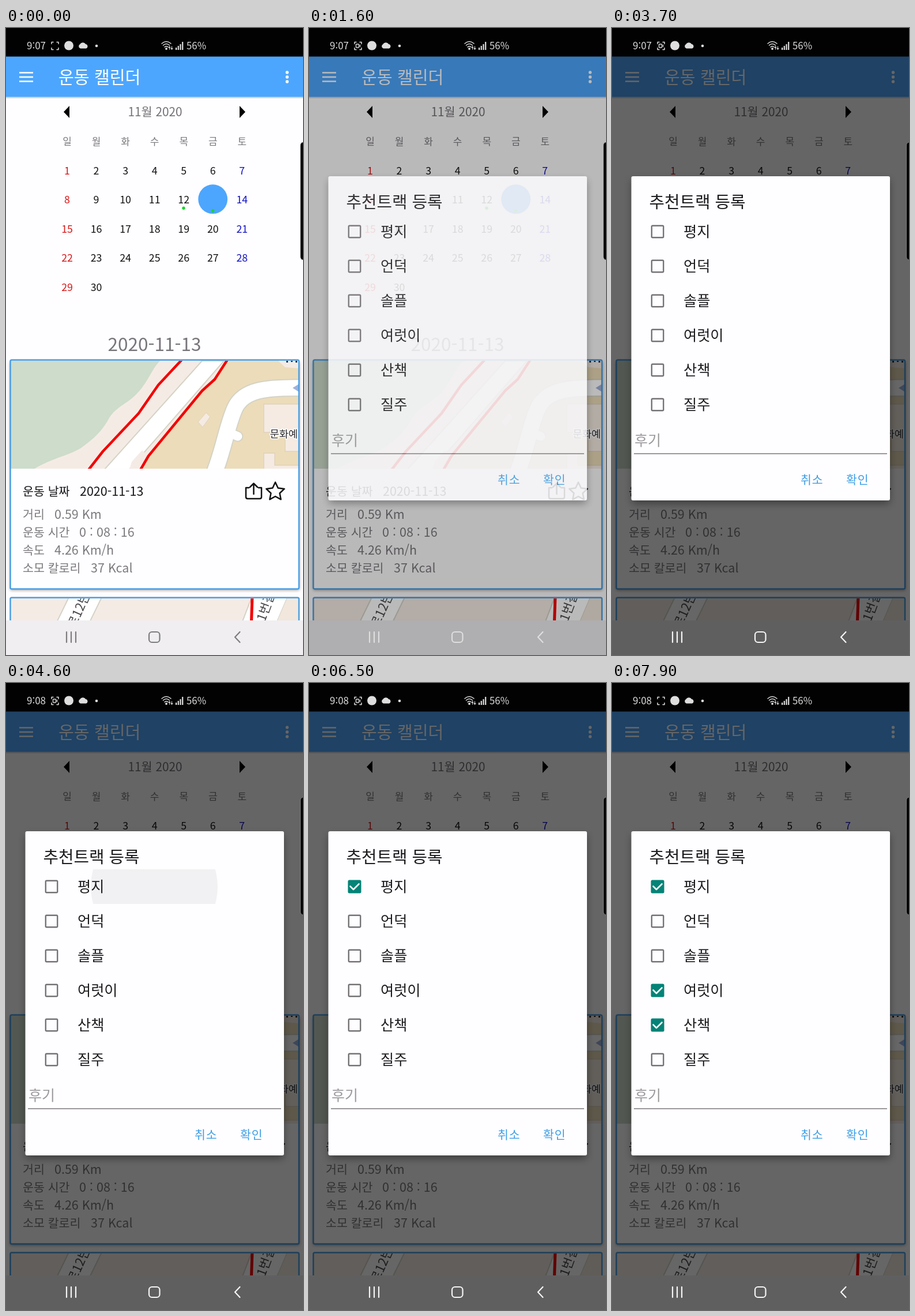
Animation of 515 by 1087 pixels, one loop 8 s. Source, as an HTML page:

```html
<!DOCTYPE html>
<html lang="ko">
<head>
<meta charset="utf-8">
<title>운동 캘린더</title>
<style>
  html, body { margin: 0; width: 100%; height: 100%; overflow: hidden; background: #000; }
  svg { display: block; width: 515px; height: 1087px; }
  text { font-family: "Noto Sans CJK KR", "Noto Sans CJK", "Noto Sans", sans-serif; }
  .mid { text-anchor: middle; }
  .line { fill: none; stroke-linecap: round; stroke-linejoin: round; }
</style>
</head>
<body>
<svg viewBox="0 0 515 1087">
  <defs>
    <clipPath id="map1"><rect x="8" y="577" width="499" height="187"/></clipPath>
    <clipPath id="map2"><rect x="8" y="989" width="499" height="38"/></clipPath>
    <clipPath id="rowClip"><rect id="rowBox" x="34" width="447" height="60"/></clipPath>
    <filter id="soft" x="-10%" y="-10%" width="120%" height="120%"><feGaussianBlur stdDeviation="2.5"/></filter>
    <filter id="deep" x="-10%" y="-10%" width="120%" height="120%"><feGaussianBlur stdDeviation="7"/></filter>
  </defs>

  <rect width="515" height="1087" fill="#fefdff"/>

  <!-- app bar -->
  <rect y="119" width="515" height="3" fill="#000" opacity=".12"/>
  <rect y="49" width="515" height="70.500" fill="#4da6fd"/>
  <path d="M23 77.500H47M23 85H47M23 92.500H47" stroke="#fff" stroke-width="2.400"/>
  <text x="91" y="95.500" font-size="29.200" fill="#fff">운동 캘린더</text>
  <g fill="#fff"><circle cx="487.500" cy="77" r="2.700"/><circle cx="487.500" cy="85" r="2.700"/><circle cx="487.500" cy="93" r="2.700"/></g>

  <!-- calendar -->
  <path d="M110 135V156L100 145.500ZM405 135V156L415 145.500Z" fill="#000"/>
  <text class="mid" x="258.500" y="153" font-size="20.800" font-weight="500" fill="#747276">11월 2020</text>
  <g id="days"></g>
  <circle cx="358.700" cy="296.700" r="25.400" fill="#4da6fd"/>
  <g fill="#18d52c"><circle cx="308" cy="312.300" r="2.700"/><circle cx="358.700" cy="317" r="2.700"/></g>
  <text class="mid" x="257.500" y="559.500" font-size="31.500" fill="#77757a">2020-11-13</text>

  <!-- first card -->
  <rect x="7" y="578" width="502" height="397" rx="3" fill="#000" opacity=".35" filter="url(#soft)"/>
  <rect x="7.500" y="575.500" width="500.500" height="397" rx="2.500" fill="#fefdff"/>
  <g clip-path="url(#map1)">
    <rect x="8" y="576" width="500" height="190" fill="#f5ebe5"/>
    <path d="M8 577H267C252 592 246 615 226 635C208 653 192 656 179 676C165 702 151 712 133 726C112 741 80 745 48 765H8Z" fill="#cddccb"/>
    <path d="M384 577L363 609 341 629 248 742 234 765H508V590L484 588 472 577Z" fill="#ecdcb9"/>
    <path d="M340 577L171 765H214L378 577Z" fill="#fff" stroke="#d4d3c6" stroke-width="2"/>
    <path d="M214 765L218 752 236 732 245 741 230 765Z" fill="#f5ebe5"/>
    <path d="M447 652H508V734H484V701H447Z" fill="#f5ebe2" stroke="#dfd2bd" stroke-width="1.500"/>
    <path d="M447 765V737H466V758H508V765Z" fill="#f5ebe2" stroke="#dfd2bd" stroke-width="1.500"/>
    <path d="M333 683L347 667 354 674 341 692Z" fill="#f5ebe2" stroke="#dfd2bd"/>
    <g class="line">
      <path d="M520 624C445 622 411 629 397 659C383 690 378 729 361 772" stroke="#d4d3c6" stroke-width="31"/>
      <path d="M388 702L402 708" stroke="#d4d3c6" stroke-width="19"/>
      <path d="M520 624C445 622 411 629 397 659C383 690 378 729 361 772" stroke="#fff" stroke-width="27"/>
      <path d="M388 702L402 708" stroke="#fff" stroke-width="15"/>
      <path d="M305 575L264 619 230 668 168 734 143 766M384 575L362 609 340 629 247 742 233 766" stroke="#f30000" stroke-width="4.500"/>
    </g>
    <path d="M497 624L508 617V631Z" fill="#9fb0dc"/>
    <path d="M486 576h3v4h-3zM494 576h3v3h-3zM502 576h3v4h-3z" fill="#333"/>
    <text x="457.500" y="710" font-size="17.600" font-weight="500" fill="#2b292c" stroke="#fff" stroke-width="3" paint-order="stroke">문화예</text>
  </g>
  <rect x="7.500" y="575.500" width="500.500" height="397" rx="2.500" fill="none" stroke="#4a9fe2" stroke-width="2.500"/>
  <g id="facts"></g>
  <g class="line" stroke="#111" stroke-width="2.500">
    <path d="M421 797H416V813Q416 816 419 816H440Q443 816 443 813V797H438M429.500 808V790M423 796L429.500 789.500 436 796"/>
    <path id="star"/>
  </g>

  <!-- second card -->
  <rect x="7.500" y="987.500" width="500.500" height="60" rx="2.500" fill="#f5ebe5"/>
  <g clip-path="url(#map2)">
    <path d="M109 987L86 1034H143L166 987Z" fill="#fff" stroke="#d4d3c6" stroke-width="2"/>
    <path d="M426 987L408 1034H468L488 987Z" fill="#fff" stroke="#d4d3c6" stroke-width="2"/>
    <path d="M488 987L468 1034H508V987Z" fill="#f1e7dc"/>
    <path d="M427 986L425.500 1030" stroke="#f30000" stroke-width="5"/>
    <g font-size="22" fill="#4a484b">
      <text transform="translate(120 1042) rotate(-66)">로12번</text>
      <text transform="translate(449 1030) rotate(-70)">1번길</text>
    </g>
  </g>
  <rect x="7.500" y="987.500" width="500.500" height="60" rx="2.500" fill="none" stroke="#4a9fe2" stroke-width="2.500"/>
  <rect y="1027" width="515" height="60" fill="#f0eef1"/>

  <rect id="dim" y="49" width="515" height="1038" fill="#000"/>

  <g id="nav" class="line" stroke-width="2.200">
    <path d="M105 1047V1065M113 1047V1065M121 1047V1065"/>
    <rect x="248" y="1047" width="18.500" height="18" rx="5"/>
    <path d="M405.500 1047L397 1056 405.500 1065"/>
  </g>
  <path d="M516 198Q510.500 198 510.500 204V396Q510.500 402 516 402Z" fill="#050505" stroke="#aaa" stroke-width=".6"/>

  <!-- dialog -->
  <g id="dialog">
    <rect x="35" y="264" width="446" height="560" fill="#000" opacity=".4" filter="url(#deep)"/>
    <rect x="33.500" y="257" width="448.500" height="562" rx="3" fill="#fefdff"/>
    <circle id="ripple" cx="257" fill="#000" clip-path="url(#rowClip)"/>
    <text x="64.500" y="312" font-size="28.800" fill="#1c1b1d">추천트랙 등록</text>
    <g id="items"></g>
    <text x="39" y="723.500" font-size="25" fill="#9b999c">후기</text>
    <path d="M38 738H477" stroke="#7b797c" stroke-width="1.600"/>
    <g font-size="20.500" fill="#3d9fe6" letter-spacing="1"><text x="327" y="790.500">취소</text><text x="406" y="790.500">확인</text></g>
  </g>

  <!-- status bar -->
  <rect width="515" height="49.500" fill="#020202"/>
  <g fill="#dedede">
    <text id="clock" x="36" y="37" font-size="17"></text>
    <circle cx="109" cy="30.500" r="8"/>
    <path d="M129 35.500A4 4 0 0 1 128.500 28A5.500 5.500 0 0 1 138 28A3.900 3.900 0 0 1 139 35.500Z"/>
    <circle cx="157" cy="31" r="2.300"/>
    <path d="M294 34h2.200v4H294zM297.700 31h2.200v7h-2.200zM301.400 28h2.200v10h-2.200zM305.100 24h2.200v14h-2.200z"/>
    <text x="313" y="37" font-size="16.800">56%</text>
    <circle cx="278" cy="36" r="1.900"/>
  </g>
  <g class="line" stroke="#dedede" stroke-width="1.500">
    <path d="M79 27.500V24.500H82M88 24.500H91V27.500M91 34.500V37.500H88M82 37.500H79V34.500"/>
    <path d="M270 27Q278 20 286 27M272.500 30Q278 25 283.500 30M275 33Q278 30.500 281 33"/>
    <path d="M283.500 37V32M282 34L283.500 32 285 34M287.500 32V37M286 35.500L287.500 37 289 35.500" stroke-width="1.100"/>
    <g id="camera" stroke-width="1.400"><rect x="81.500" y="28" width="5" height="6" rx="1"/><path d="M88.500 29.500V32.500"/></g>
  </g>
</svg>
<script>
const LOOP = 8000, STEP = 100;
const $ = id => document.getElementById(id);
const set = (el, attrs) => { for (const k in attrs) el.setAttribute(k, attrs[k]); };

// Calendar
const colX = i => 106 + 50.55 * i;
const label = (x, y, size, fill, s) =>
  `<text class="mid" x="${x}" y="${y}" font-size="${size}" fill="${fill}">${s}</text>`;
let days = [...'일월화수목금토'].map((d, i) => label(colX(i), 202.5, 17, '#7b797c', d)).join('');
for (let d = 1; d <= 30; d++) {
  if (d === 13) continue;
  const col = (d - 1) % 7, row = Math.floor((d - 1) / 7);
  const fill = col === 0 ? '#d81717' : col === 6 ? '#1212c4' : '#111';
  days += label(colX(col), 253.5 + 50.5 * row, 17.8, fill, d);
}
$('days').innerHTML = days;

// Workout details
const facts = [
  ['거리', '0.59 Km', 84], ['운동 시간', '0 : 08 : 16', 127],
  ['속도', '4.26 Km/h', 84], ['소모 칼로리', '37 Kcal', 147]
];
const fact = (name, value, x, y, style) =>
  `<g ${style}><text x="29" y="${y}" font-size="20.6">${name}</text>` +
  `<text x="${x}" y="${y}" font-size="21.5">${value}</text></g>`;
$('facts').innerHTML =
  fact('운동 날짜', '2020-11-13', 128, 811, 'fill="#161517" font-weight="500"') +
  facts.map(([n, v, x], i) => fact(n, v, x, 850.5 + 31.2 * i, 'fill="#7b797c"')).join('');

$('star').setAttribute('d', 'M' + Array.from({ length: 10 }, (_, i) => {
  const a = (i / 5 - 0.5) * Math.PI, r = i % 2 ? 8 : 16.5;
  return (467 + r * Math.cos(a)).toFixed(1) + ' ' + (804 + r * Math.sin(a)).toFixed(1);
}).join('L') + 'Z');

// Check list
const rowY = i => 353 + 60 * i;
const rows = ['평지', '언덕', '솔플', '여럿이', '산책', '질주'].map((name, i) => {
  const g = document.createElementNS('http://www.w3.org/2000/svg', 'g');
  g.setAttribute('transform', `translate(79 ${rowY(i)})`);
  g.innerHTML = `<rect x="-10.2" y="-10.2" width="20.400" height="20.400" rx="1.500" fill="none" stroke="#757376" stroke-width="2.400"/>
    <rect x="-11.500" y="-11.500" width="23" height="23" rx="2.500" fill="#048377"/>
    <path class="line" d="M-5.500 -5L0 .5 9.500 -9" stroke="#fff" stroke-width="2.600"/>
    <text x="45" y="9" font-size="25.200" fill="#1c1b1d">${name}</text>`;
  $('items').append(g);
  const [box, fill, mark] = g.children;
  return { box, fill, mark };
});

const presses = [[4600, 0], [7000, 4], [7400, 3]];
const rippleAlpha = [.05, .08, .08, .05, .02];
const markScale = [0, .14, .65, 1];

// Linear interpolation over [time, value] points
function track(t, points) {
  if (t <= points[0][0]) return points[0][1];
  for (let i = 1; i < points.length; i++) {
    const [t0, v0] = points[i - 1], [t1, v1] = points[i];
    if (t <= t1) return v0 + (v1 - v0) * (t - t0) / (t1 - t0);
  }
  return points[points.length - 1][1];
}

function draw(t) {
  const dim = track(t, [[1500, 0], [1600, .27], [1700, .52], [1800, .6]]);
  set($('dim'), { opacity: dim });
  set($('dialog'), { opacity: track(t, [[1500, 0], [1600, .85], [1700, 1]]) });
  const tone = Math.round(track(dim, [[0, 125], [.27, 222], [.6, 245]]));
  set($('nav'), { stroke: `rgb(${tone},${tone},${tone})` });

  $('clock').textContent = t < 4200 ? '9:07' : '9:08';
  const beat = t % 1000;
  set($('camera'), { opacity: beat >= 250 && beat < 750 ? 1 : 0 });

  set($('ripple'), { opacity: 0 });
  rows.forEach(({ box, fill, mark }, i) => {
    const press = presses.find(p => p[1] === i);
    const age = press ? Math.floor((t - press[0]) / STEP) : -1;
    const on = age > 0;
    set(box, { opacity: on ? 0 : 1 });
    set(fill, { opacity: on ? 1 : 0, transform: `scale(${age === 1 ? .9 : 1})` });
    set(mark, {
      opacity: on ? 1 : 0,
      transform: `translate(-2 4.500) scale(${markScale[Math.max(0, Math.min(age, 3))]})`
    });
    if (age >= 0 && age < rippleAlpha.length) {
      set($('rowBox'), { y: rowY(i) - 30 });
      set($('ripple'), { cy: rowY(i), r: age ? 240 : 110, opacity: rippleAlpha[age] });
    }
  });
}

const start = performance.now();
function tick() {
  const t = (performance.now() - start) % LOOP;
  draw(Math.floor(t / STEP) * STEP);
  requestAnimationFrame(tick);
}
tick();
</script>
</body>
</html>
```
